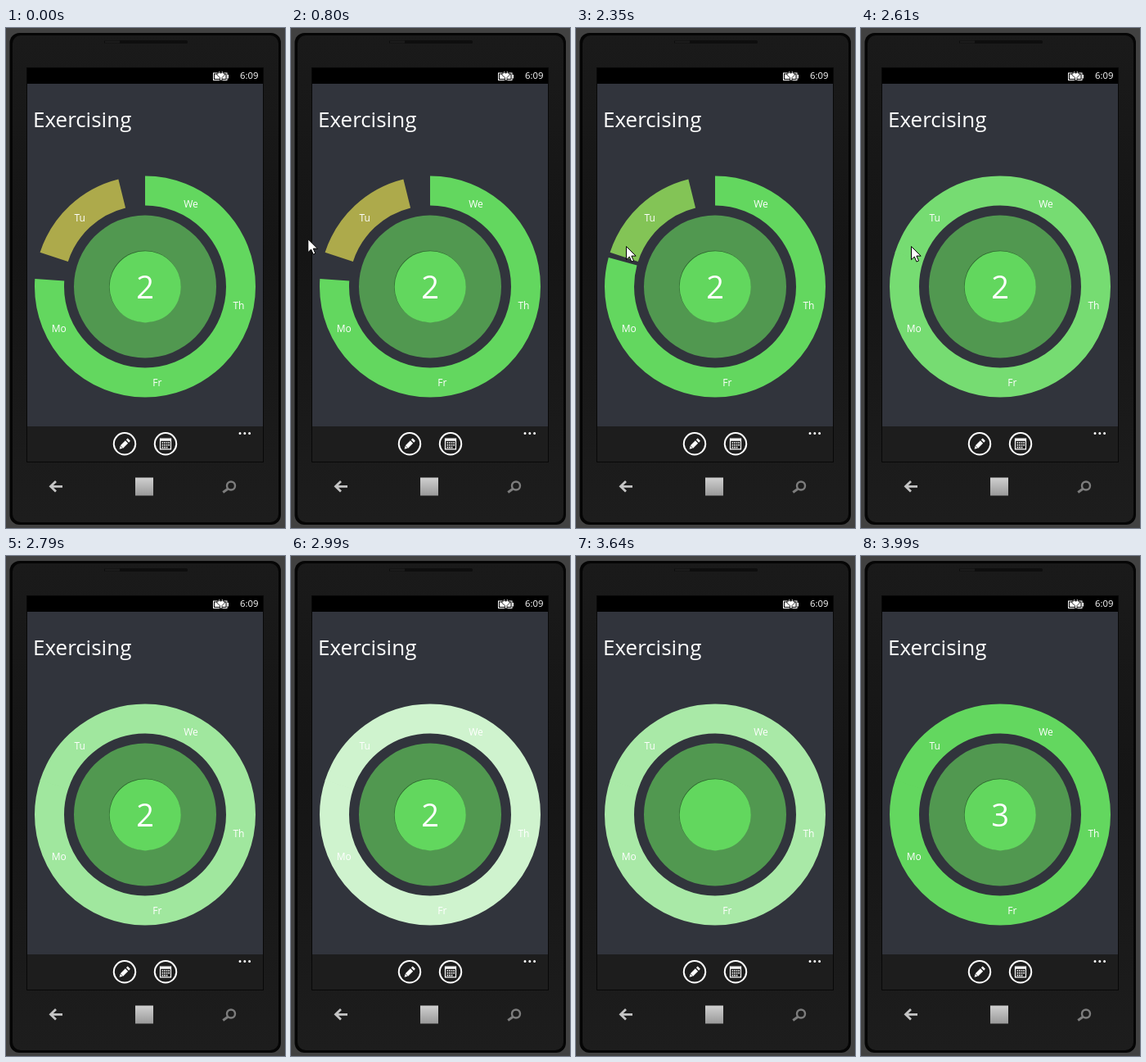
These frames come from a looping animation (341 by 610 pixels, 7.06 s). An HTML page:

```html
<!DOCTYPE html>
<html lang="en">
<head>
<meta charset="utf-8">
<title>Exercising</title>
<style>
  html, body { margin: 0; width: 100%; height: 100%; overflow: hidden; background: #414141; }
  svg { display: block; width: 100%; height: 100%; }
  text { font-family: "Open Sans", "Noto Sans", sans-serif; fill: #fff; }
  .label { font-size: 12px; text-anchor: middle; }
  .line { fill: none; stroke: #fff; stroke-width: 2; }
</style>
</head>
<body>
<svg viewBox="0 0 341 610">
  <defs>
    <linearGradient id="body" x1="0" y1="0" x2="0" y2="1">
      <stop offset="0" stop-color="#1a1a1a"/>
      <stop offset=".45" stop-color="#151515"/>
      <stop offset="1" stop-color="#1d1d1d"/>
    </linearGradient>
    <linearGradient id="metal" x1="0" y1="0" x2="0" y2="1">
      <stop offset="0" stop-color="#d0d0d0"/>
      <stop offset="1" stop-color="#999"/>
    </linearGradient>
  </defs>

  <!-- Phone -->
  <rect width="341" height="610" fill="#414141"/>
  <rect x="4.5" y="6" width="331.5" height="600" rx="12" fill="#050505"/>
  <rect x="8" y="9" width="325" height="594" rx="10" fill="url(#body)"/>
  <rect x="120" y="15" width="102" height="4" rx="1.5" fill="#0e0e0e"/>
  <rect x="121" y="15.5" width="18" height="3" fill="#1c1c1c"/>
  <rect x="25" y="48" width="290" height="482" fill="#080808"/>
  <rect x="26" y="68" width="288" height="418" fill="#31343c"/>
  <rect x="26" y="49" width="288" height="19" fill="#000"/>
  <rect x="26" y="486" width="288" height="43" fill="#1d1d1d"/>

  <!-- Status bar -->
  <rect x="253.5" y="55" width="16.5" height="8.5" fill="none" stroke="#fff"/>
  <path d="M255 56.5h13.5v5.5H255zM270.5 57h1.5v4.5h-1.5z" fill="#fff"/>
  <path d="M258 55h2v-2.5h1.5V55h2v-2.5h1.5V55h2v2.5l-3 3V64h-2.5v-3.5l-3.5-3z" fill="#fff" stroke="#000" stroke-width=".8"/>
  <text x="286" y="62" font-size="11.3">6:09</text>

  <text x="33" y="121" font-size="26">Exercising</text>

  <!-- Week ring -->
  <g fill="none" stroke-width="36" transform="rotate(-90 170 315.5)">
    <circle id="done" cx="170" cy="315.5" r="117" pathLength="360"/>
    <circle id="today" cx="170" cy="315.5" r="117" pathLength="360" stroke-dashoffset="-288"/>
  </g>
  <circle cx="170" cy="315.5" r="87" fill="#519850"/>
  <circle cx="169.7" cy="315.2" r="43.7" fill="#2f6830"/>
  <circle cx="170.2" cy="315.8" r="43.6" fill="#62d75e"/>
  <g id="days"></g>
  <text id="count" x="170" y="330" font-size="38" text-anchor="middle">2</text>

  <!-- App bar -->
  <circle class="line" cx="145" cy="507.3" r="13.2"/>
  <circle class="line" cx="195" cy="507.3" r="13.2"/>
  <path d="M141.5 511l6-6M148.5 504l1.8-1.8" class="line" style="stroke-width:4.6"/>
  <path d="M138.6 513.8l1-4 3 3z" fill="#fff"/>
  <path d="M188.5 501h13v12.8h-13z" class="line" style="stroke-width:1.2"/>
  <path d="M188.5 502.5h13" class="line" style="stroke-width:2.5"/>
  <path d="M190.5 506h9.5M190.5 508.8h9.5M190.5 511.6h7" class="line" stroke-dasharray="1.7 .9" style="stroke-width:1.6"/>
  <path d="M286 494.5h12" class="line" stroke-dasharray="0 5.8" stroke-linecap="round" style="stroke-width:3"/>

  <!-- Hardware keys -->
  <path d="M69 559.3H55M61 553l-6.5 6.3 6.5 6.3" fill="none" stroke="#c4c4c4" stroke-width="2.8"/>
  <rect x="158" y="548.5" width="22" height="22" fill="url(#metal)"/>
  <g fill="none" stroke="#7d7d7d" stroke-width="2.4">
    <circle cx="275" cy="558.5" r="5"/>
    <path d="M271.2 562.2l-6 4.2" stroke-width="3"/>
  </g>

  <path id="cursor" d="M.5.5v16.2l3.8-3.6 2.6 6 2.6-1.1-2.6-5.9h5.3z" fill="#fff" stroke="#000"/>
</svg>
<script>
const LOOP = 7060;
const GREEN = [99, 215, 95], OLIVE = [173, 170, 75], WHITE = [255, 255, 255];
const $ = id => document.getElementById(id);
const clamp = (v, max = 1) => Math.max(0, Math.min(max, v));
const progress = (t, from, to) => clamp((t - from) / (to - from));
const easeOut = p => Math.sin(p * Math.PI / 2);
const mix = (a, b, k) => a.map((v, i) => v + (b[i] - v) * k);

// Each day owns 72 degrees; its label sits in the middle of the unfinished arc.
["We", "Th", "Fr", "Mo", "Tu"].forEach((day, i) => {
  const angle = (28.7 + 72 * i) * Math.PI / 180;
  const x = 170 + 116.5 * Math.sin(angle), y = 321 - 116.5 * Math.cos(angle);
  $("days").innerHTML += `<text class="label" x="${x}" y="${y}">${day}</text>`;
});

function arc(id, length, color) {
  $(id).setAttribute("stroke", `rgb(${color.map(Math.round)})`);
  $(id).setAttribute("stroke-dasharray", `${length} 360`);
}

function draw(t) {
  // The gaps close one after the other, overlapping slightly to hide the seams.
  const close = t < 2350 ? 0 : progress(t, 2122, 2522);
  const complete = progress(t, 2440, 2620);
  const white = clamp(Math.min(t - 2530, 3940 - t) * .0015, .9);
  arc("done", 274 + 14.4 * easeOut(close), mix(GREEN, WHITE, white));
  arc("today", 58 + 14.4 * easeOut(complete), mix(mix(OLIVE, GREEN, close), WHITE, white));

  const fadeOut = 1 - progress(t, 3460, 3580), fadeIn = progress(t, 3730, 3990);
  $("count").textContent = t < 3640 ? 2 : 3;
  $("count").setAttribute("opacity", fadeOut + fadeIn);

  const move = 1 - (1 - progress(t, 620, 1420)) ** 2;
  $("cursor").style.display = t >= 620 && t < 2620 ? "" : "none";
  $("cursor").setAttribute("transform", `translate(${-7 + 68 * move} ${251 + 15 * move})`);
}

const start = performance.now();
function tick() {
  draw((performance.now() - start) % LOOP);
  requestAnimationFrame(tick);
}
tick();
</script>
</body>
</html>
```
